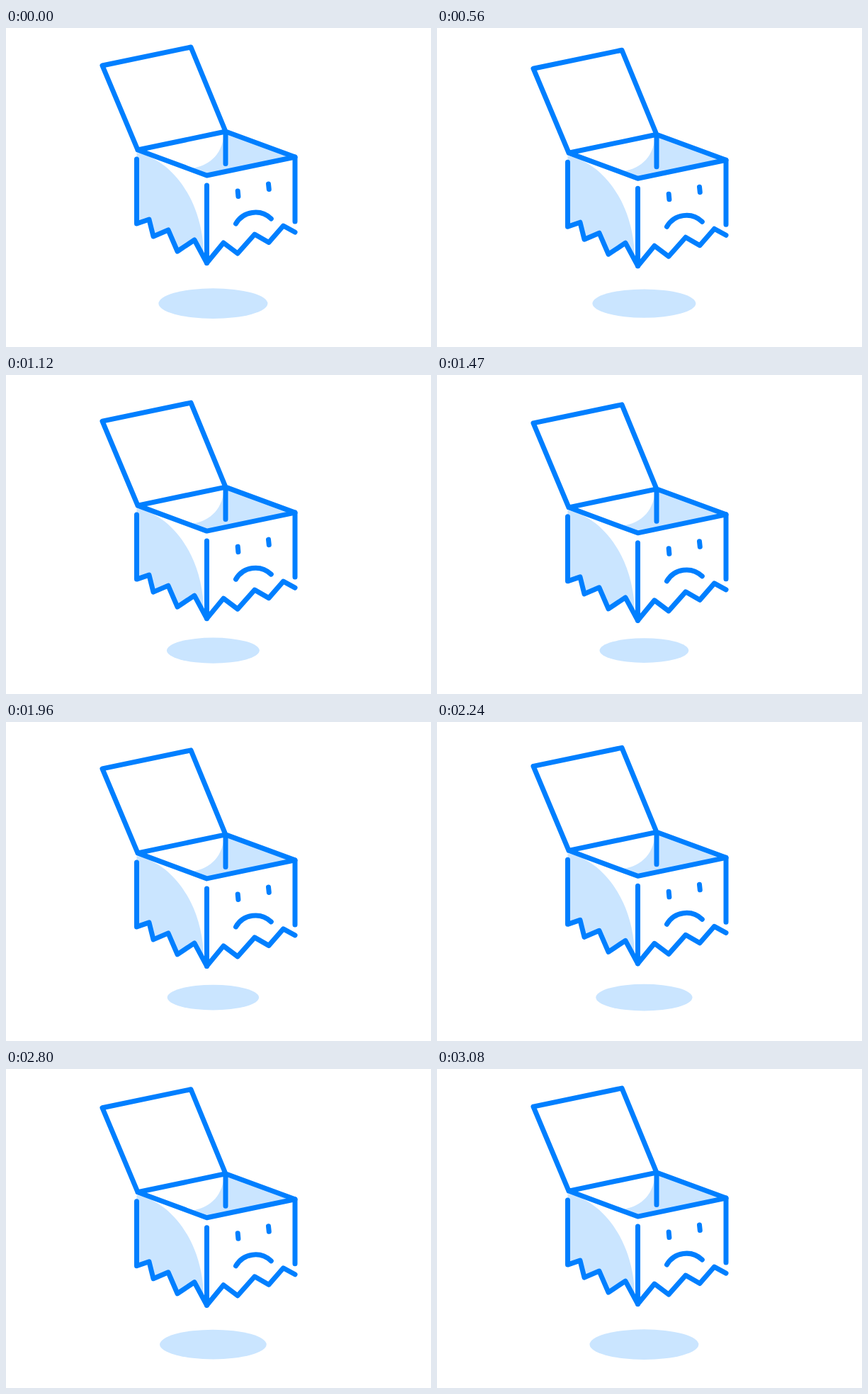
Animation, 600 px wide and 450 px high, one loop 3.15 s. Source, as an HTML page:

```html
<!DOCTYPE html>
<html lang="en">
<head>
<meta charset="utf-8">
<title>Empty box</title>
<style>
  html, body { margin: 0; width: 100%; height: 100%; overflow: hidden; background: #fff; }
  svg { display: block; width: 600px; height: 450px; }
  .line { fill: none; stroke: #007fff; stroke-width: 7; stroke-linecap: round; stroke-linejoin: round; }
  .shade { fill: #cae5ff; }
</style>
</head>
<body>
<svg viewBox="0 0 600 450">
  <ellipse id="shadow" class="shade" cx="292.4" cy="388.6"/>
  <g id="box">
    <path class="shade" d="M184.5 176C236 186 279 246 279 322L266 299L242 315L229 285L208 294L202 270L184.5 276Z"/>
    <path class="shade" d="M308 146C307 175 290 194 262 198L283 208L408 182L310 146Z"/>
    <g class="line">
      <path d="M186 172L136 53L261 27L310 146ZL283.5 208L408 182L310 146V191.5"/>
      <path d="M184.5 185V276L202 270L208 294L229 285L242 315L266 299L283.5 331.5L307 303L327 318L351 291L371 302.5L391.5 279L408 288"/>
      <path d="M283.5 222V331.5M408 182V273"/>
      <path d="M327.2 230L327.9 237.5M370.5 220L371.3 227.5"/>
      <path d="M324.5 276A32 32 0 0 1 374.3 269"/>
    </g>
  </g>
  <path id="sparks" class="line"/>
</svg>
<script>
  const LOOP = 3150, STEP = 70;
  const SPARK_START = 2240, SPARK_TIME = 560, REACH = 30;
  const $ = id => document.getElementById(id);

  // Each spark at its longest: inner end, outer end
  const sparks = [
    [357.5, 70.5, 359.5, 66.5],
    [434, 90, 445.5, 84],
    [438.5, 157, 428.5, 155.5].map((v, i, a) => a[(i + 2) % 4]),
    [114, 128, 110.5, 126],
    [89, 197.7, 76.5, 200.7]
  ];

  function sparkPath([x1, y1, x2, y2], s) {
    const dx = x2 - x1, dy = y2 - y1, len = Math.hypot(dx, dy);
    const shift = REACH * (2 * s - 1) / len;
    const half = Math.sin(Math.PI * s) / 2;
    const at = k => `${(x1 + x2) / 2 + dx * k} ${(y1 + y2) / 2 + dy * k}`;
    return `M${at(shift - half)}L${at(shift + half)}`;
  }

  function draw(time) {
    const t = Math.floor(time % LOOP / STEP) * STEP;
    const drop = (1 - Math.cos(2 * Math.PI * t / LOOP)) / 2;
    $("box").setAttribute("transform", `translate(0 ${15 * drop})`);
    $("shadow").setAttribute("rx", 77 - 14.3 * drop);
    $("shadow").setAttribute("ry", 21.3 - 4 * drop);

    const s = (t - SPARK_START) / SPARK_TIME;
    const visible = s > 0 && s < 1;
    $("sparks").setAttribute("d", visible ? sparks.map(p => sparkPath(p, s)).join("") : "");
  }

  const start = performance.now();
  function tick() {
    draw(performance.now() - start);
    requestAnimationFrame(tick);
  }
  tick();
</script>
</body>
</html>
```
